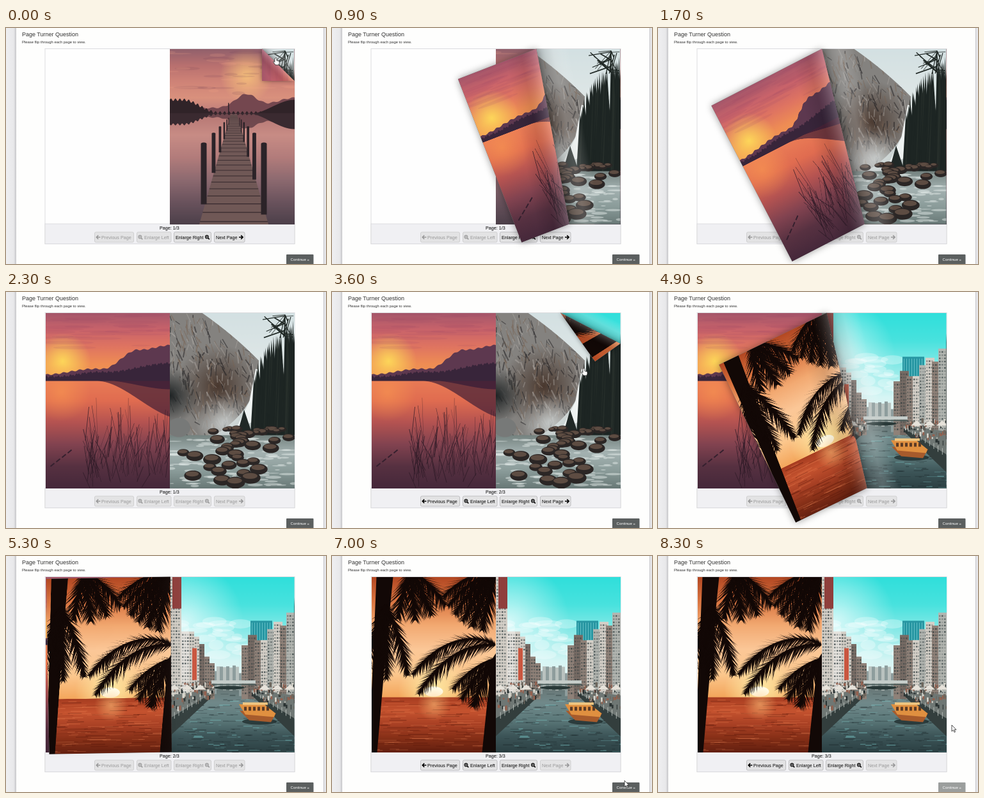
Animation of 500 by 370 pixels, one loop 8400 ms. Source, as an HTML page with a canvas:

```html
<!DOCTYPE html>
<html lang="en">
<head>
<meta charset="utf-8">
<title>Page Turner</title>
<style>
  html, body { margin: 0; width: 100%; height: 100%; overflow: hidden; background: #fefefd; }
  svg, canvas { position: absolute; left: 0; top: 0; width: 500px; height: 370px; }
  text { font-family: "Liberation Sans", Arial, sans-serif; }
  .btn text { font-size: 7.2px; fill: #000; }
  .btn rect { fill: #e3e3e4; stroke: #b4b4b6; stroke-width: .8; }
  .off text, .off use { opacity: .33; }
  .off rect { stroke: #c9c9cb; }
</style>
</head>
<body>
<svg viewBox="0 0 500 370">
  <defs>
    <linearGradient id="edge"><stop stop-color="#efeff1"/><stop offset=".75" stop-color="#e8e8ea"/><stop offset="1" stop-color="#c6c6c9"/></linearGradient>
    <path id="back" d="M3.2-3L.4 0l2.8 3M.6 0H6.4" fill="none" stroke="#000" stroke-width="1.7"/>
    <path id="next" d="M3.2-3L6 0 3.2 3M5.8 0H0" fill="none" stroke="#000" stroke-width="1.7"/>
    <g id="zoom" fill="none" stroke="#000"><circle cx="2.9" cy="-.5" r="2.4" stroke-width="1.1"/><path d="M4.7 1.3L6.8 3.4" stroke-width="1.6"/><path d="M1.6-.5h2.6M2.9-1.8v2.6" stroke-width=".8"/></g>
  </defs>
  <rect width="500" height="370" fill="#fefefd"/>
  <rect width="16" height="370" fill="url(#edge)"/>
  <rect x="496" width="4" height="370" fill="#e6e6e9"/>
  <rect x="496" width="1" height="370" fill="#c6c6c9"/>
  <text x="25" y="13" font-size="9" fill="#333">Page Turner Question</text>
  <text x="25" y="24" font-size="5.9" fill="#333">Please flip through each page to view.</text>
  <rect x="61" y="32.5" width="390" height="306" fill="#fefefe" stroke="#d9d9dc" stroke-width=".9"/>
  <rect x="61" y="307" width="390" height="31.5" fill="#f0f0f3" stroke="#d9d9dc" stroke-width=".9"/>
  <text id="label" x="240" y="316" font-size="7.2">Page: 1/3</text>
  <g class="btn"><rect x="138.5" y="320" width="61" height="16" rx="2"/><use href="#back" x="141" y="328"/><text x="149" y="330.5">Previous Page</text></g>
  <g class="btn"><rect x="204.5" y="320" width="53.5" height="16" rx="2"/><use href="#zoom" x="206.5" y="328"/><text x="216" y="330.5">Enlarge Left</text></g>
  <g class="btn"><rect x="262.5" y="320" width="58" height="16" rx="2"/><use href="#zoom" x="311" y="328"/><text x="265" y="330.5">Enlarge Right</text></g>
  <g class="btn"><rect x="325.5" y="320" width="47.5" height="16" rx="2"/><use href="#next" x="364" y="328"/><text x="328" y="330.5">Next Page</text></g>
  <g id="go"><rect x="438" y="355" width="42.5" height="16" rx="1" fill="#5b5f5f"/><text x="444.5" y="365" font-size="6.1" fill="#fff">Continue »</text></g>
</svg>
<canvas id="stage"></canvas>
<script>
const LOOP = 8400, W = 194.5, H = 275, LEFT = 61.5, SPINE = 256, TOP = 32.5;
const stage = document.getElementById('stage'), ctx = stage.getContext('2d');
const label = document.getElementById('label'), go = document.getElementById('go');
const buttons = [...document.querySelectorAll('.btn')];
const dpr = window.devicePixelRatio || 1;
stage.width = 500 * dpr;
stage.height = 370 * dpr;

// ---- painting helpers ----
const clamp = v => Math.max(0, Math.min(1, v));
const mix = (a, b, k) => a + (b - a) * k;
const smooth = (a, b, v) => { const k = clamp((v - a) / (b - a)); return k * k * (3 - 2 * k); };
const bump = (x, center, width) => Math.exp(-(((x - center) / width) ** 2));

function random(seed) {
  return (a = 0, b = 1) => {
    seed = (seed * 16807) % 2147483647;
    return mix(a, b, seed / 2147483647);
  };
}
function scene(seed, paint) {
  const el = document.createElement('canvas');
  el.width = W * 2;
  el.height = H * 2;
  const c = el.getContext('2d');
  c.scale(2, 2);
  paint(c, random(seed));
  return el;
}
function stops(g, colors) {
  colors.forEach((col, i) => g.addColorStop(i / (colors.length - 1), col));
  return g;
}
function box(c, color, x, y, w, h) {
  c.fillStyle = color;
  c.fillRect(x, y, w, h);
}
function band(c, y0, y1, ...colors) {
  box(c, stops(c.createLinearGradient(0, y0, 0, y1), colors), 0, y0, W + 1, y1 - y0);
}
function glow(c, x, y, r, rgb, alpha) {
  box(c, stops(c.createRadialGradient(x, y, 0, x, y, r), [`rgba(${rgb},${alpha})`, `rgba(${rgb},0)`]), x - r, y - r, 2 * r, 2 * r);
}
function poly(c, color, ...p) {
  c.fillStyle = color;
  c.beginPath();
  for (let i = 0; i < p.length; i += 2) c.lineTo(p[i], p[i + 1]);
  c.fill();
}
function ridge(c, color, base, height) {
  c.fillStyle = color;
  c.beginPath();
  c.moveTo(0, base);
  for (let x = 0; x <= W + 1; x++) c.lineTo(x, base - height(x));
  c.lineTo(W + 1, base);
  c.fill();
}
function blob(c, color, x, y, rx, ry) {
  c.fillStyle = color;
  c.beginPath();
  c.ellipse(x, y, rx, ry, 0, 0, 7);
  c.fill();
}
function line(c, color, width, x0, y0, x1, y1) {
  c.strokeStyle = color;
  c.lineWidth = width;
  c.beginPath();
  c.moveTo(x0, y0);
  c.lineTo(x1, y1);
  c.stroke();
}
function repeat(n, draw) {
  for (let i = 0; i < n; i++) draw(i, i / n);
}

// ---- the five pictures ----
const pier = scene(11, (c, r) => {
  band(c, 0, 103, '#90606c', '#b8706f', '#cf8377', '#d9917d', '#b97b7b');
  glow(c, 120, 42, 42, '255,205,125', .8);
  repeat(40, i => blob(c, i % 2 ? 'rgba(105,62,80,.14)' : 'rgba(245,170,135,.16)', r(0, W), r(4, 75), r(8, 28), r(1, 3)));
  band(c, 101, H, '#b57673', '#c88c85', '#b27c7b', '#8d6a70', '#6a535d', '#4d404a');
  const hills = x => 8 + 22 * bump(x, 120, 24) + 16 * smooth(130, W, x) + Math.sin(x * .4);
  const trees = x => 22 - 20 * smooth(20, 75, x) + 2 * Math.sin(x * .9);
  ridge(c, '#74474f', 101, hills);
  ridge(c, 'rgba(80,50,60,.7)', 101, x => -.8 * hills(x));
  ridge(c, '#302328', 102, x => Math.max(trees(x), 22 * smooth(125, W, x)));
  ridge(c, '#3a2a30', 101, x => -Math.max(trees(x) * .8, 25 * smooth(120, W, x)));
  box(c, '#30242a', 91, 85, 1.5, 18);
  poly(c, '#705856', 95, 103, 105, 103, 154, H, 46, H);
  for (let y = 105, gap = 1.6; y < H; y += gap, gap *= 1.085) {
    const k = (y - 103) / 172;
    line(c, '#3b2d30', .5 + k, 95 - 49 * k, y, 105 + 49 * k, y);
  }
  for (let s = 1; s > .1; s *= .65) {
    for (const [x, foot] of [[97 - 44 * s, 141], [104 + 43 * s, 157]]) {
      box(c, '#2b2328', x - 4.5 * s, 103 + 46 * s, 9 * s, (foot - 46) * s);
      blob(c, '#2b2328', x, 103 + 46 * s, 4.5 * s, 2 * s);
    }
  }
});

const lake = scene(5, (c, r) => {
  band(c, 0, 106, '#a4566a', '#c9636a', '#df7461', '#ee8c54', '#f09a52');
  glow(c, 27, 76, 44, '255,222,90', .9);
  repeat(30, () => blob(c, 'rgba(150,70,100,.12)', r(0, W), r(0, 60), r(15, 45), r(1, 3)));
  band(c, 104, H, '#ea7c56', '#e06c50', '#b45351', '#824350', '#573141', '#45283a');
  glow(c, 25, 125, 45, '255,160,80', .5);
  const mountain = x => 10 + 9 * smooth(0, 75, x) + 30 * smooth(90, 145, x) + 7 * smooth(150, W, x) + Math.sin(x * .5);
  const forest = x => 7 + 7 * smooth(20, 80, x) + 14 * smooth(95, W, x) + 2 * Math.sin(x) * Math.sin(x * .37);
  ridge(c, '#5d384f', 107, mountain);
  ridge(c, '#38253a', 107, forest);
  ridge(c, '#38253a', 106, x => -14 * smooth(90, W, x));
  ridge(c, 'rgba(75,35,55,.75)', 107, x => -52 * smooth(80, 215, x) * 1.15);
  repeat(110, () => {
    const x = r(62, W), y = r(200, H);
    line(c, 'rgba(42,24,36,.75)', r(.3, 1), x, y, x + r(-16, 18), y - r(20, 75));
  });
  repeat(4, i => line(c, '#35202e', 2, 8 + i * 9, 241 - i * 7, 14 + i * 9, 236 - i * 7));
});

const falls = scene(23, (c, r) => {
  band(c, 0, 195, '#d3e0e2', '#e1e8e7', '#b5bebd');
  c.save();
  c.beginPath();
  c.moveTo(0, 0);
  c.lineTo(50, 0);
  c.quadraticCurveTo(100, 35, 139, 75);
  c.quadraticCurveTo(140, 150, 70, 192);
  c.lineTo(0, 200);
  c.clip();
  box(c, '#84827f', 0, 0, W, H);
  glow(c, 75, 115, 65, '70,52,42', .95);
  repeat(420, i => {
    const x = r(0, 140), y = r(0, 190);
    line(c, ['rgba(38,36,37,.55)', 'rgba(185,180,174,.4)', 'rgba(120,98,80,.4)'][i % 3], r(.5, 2.4), x, y, x + r(-5, 9), y + r(4, 18));
  });
  glow(c, 0, 130, 45, '30,34,35', 1);
  c.restore();
  poly(c, '#eff3f2', 134, 88, 141, 90, 134, 170, 104, 180, 124, 140);
  glow(c, 85, 172, 45, '225,232,232', .7);
  repeat(60, (i, k) => {
    const x = mix(133, W, k) + r(-3, 3), top = mix(105, 18, Math.sqrt(k)) + r(-8, 12);
    poly(c, i % 4 ? '#1d2523' : '#262e2a', x, top, x + r(8, 13), 195, x - r(3, 8), 195);
  });
  repeat(24, () => line(c, '#202825', r(.5, 1.8), 180, r(0, 40), r(145, W), r(2, 44)));
  poly(c, '#202826', 116, 152, 128, 188, 106, 188);
  band(c, 192, H, '#74827f', '#a4b2b1', '#8b9c9a', '#697977');
  repeat(110, () => blob(c, 'rgba(235,241,239,.45)', r(0, W), r(196, 273), r(3, 15), r(.6, 2.4)));
  repeat(46, (i, k) => {
    const y = mix(182, 270, k * k), size = r(4, 9) + k * 7, x = i % 3 ? mix(r(45, W), r(0, 130), k) : r(0, W);
    blob(c, '#2b2625', x, y, size, size * .6);
    blob(c, '#5d4c42', x - 1, y - size * .2, size * .75, size * .3);
  });
  blob(c, '#777978', 14, 180, 18, 15);
});

// A stem that bends toward the ground, with leaflets on both sides.
function frond(c, r, x, y, angle, length, size) {
  const steps = Math.round(length / 2);
  repeat(steps, (i, k) => {
    angle += (Math.PI / 2 - angle) * .016;
    x += Math.cos(angle) * 2;
    y += Math.sin(angle) * 2;
    line(c, '#120806', 2.4 - k, x, y, x + Math.cos(angle) * 3, y + Math.sin(angle) * 3);
    const leaf = size * Math.sin(Math.PI * (.2 + k * .72));
    for (const turn of [-.7, .7]) {
      const a = angle + turn + r(-.18, .18), len = leaf * r(.75, 1.2);
      poly(c, '#120806', x - 1, y, x + 1.4, y, x + Math.cos(a) * len, y + Math.sin(a) * len + len * .3);
    }
  });
}
function crown(c, r, x, y, count, from, to, length, size) {
  repeat(count, i => frond(c, r, x, y, mix(from, to, i / (count - 1)), length, size));
}
const palms = scene(31, (c, r) => {
  band(c, 0, 190, '#b24722', '#d97440', '#f2a971', '#fbc797', '#fcc88e', '#f3a55a');
  glow(c, 97, 178, 55, '255,240,170', .95);
  blob(c, '#fffbe6', 97, 180, 15, 8);
  band(c, 189, H, '#a63c20', '#c5532f', '#a84024', '#852f17', '#642010');
  repeat(160, i => {
    const x = r(-10, W), y = r(191, 273);
    line(c, i % 2 ? 'rgba(85,20,8,.4)' : 'rgba(245,140,90,.3)', r(.5, 1.4), x, y, x + r(8, 40), y);
  });
  glow(c, 98, 200, 26, '255,190,120', .6);
  poly(c, '#120806', 8, 0, 34, 0, 24, 100, 9, H, 0, H, 0, 190);
  poly(c, '#120806', 188, 130, W, 120, W, H, 173, H);
  crown(c, r, 60, -12, 4, .5, 1.9, 78, 27);
  crown(c, r, 22, 42, 3, 1.1, 2, 115, 24);
  crown(c, r, W, -8, 6, 3.2, 1.9, 92, 27);
  crown(c, r, W, 108, 2, 3.75, 3.35, 150, 25);
  crown(c, r, W, 128, 3, 2.9, 2.2, 82, 25);
});

function tower(c, r, x, top, w) {
  const walls = ['#d5d0c8', '#8f8178', '#b3b6b1', '#e6e3de', '#776b64', '#c9a292'];
  box(c, walls[Math.floor(r(0, 6))], x, top, w, 192 - top);
  for (let y = top + 4; y < 186; y += 5) {
    for (let v = x + 1; v < x + w - 2; v += 4) box(c, `rgba(45,58,60,${r(.15, .75)})`, v, y, 2.6, 2.6);
  }
}
const canal = scene(47, (c, r) => {
  band(c, 0, 175, '#2fdfdb', '#48e2de', '#8deae8', '#d5f5f4', '#f1f8f7');
  glow(c, 20, 70, 95, '245,255,255', .75);
  repeat(26, () => blob(c, 'rgba(250,255,255,.3)', r(15, 125), r(62, 125), r(8, 22), r(3, 8)));
  band(c, 172, H, '#667473', '#71898a', '#5d7a7b', '#3d5558', '#2c4043');
  repeat(190, i => {
    const y = r(182, 274), x = r(0, W);
    line(c, i % 3 ? 'rgba(25,38,40,.4)' : 'rgba(130,215,215,.4)', r(.5, 1.8), x, y, x + r(4, 18), y);
  });
  repeat(16, i => box(c, i % 2 ? '#b9c2bf' : '#8e9d9d', 58 + i * 5, r(138, 152), 5, 36));
  box(c, '#2796a2', 126, 69, 34, 110);
  for (let x = 128; x < 158; x += 4) box(c, '#62bfc6', x, 72, 1, 100);
  repeat(6, i => tower(c, r, 58 - i * 8, 128 - i * 10 + r(-8, 8), 12));
  repeat(8, i => tower(c, r, 112 + i * 10, 108 - i * 6 + r(-14, 10), 14));
  tower(c, r, 0, 0, 18);
  box(c, '#8f3f3c', 4, 0, 14, 50);
  box(c, '#c9563f', 35, 112, 7, 50);
  for (const side of [-1, 1]) {
    const edge = side < 0 ? 0 : W, far = 98 + side * 30;
    poly(c, '#6f7774', far, 176, edge, 186, edge, 246, far, 184);
    poly(c, '#333e3d', far, 181, edge, 222, edge, 250, far, 186);
    repeat(70, (i, k) => {
      const x = mix(far, edge, k);
      box(c, ['#2b3333', '#6d665d', '#d8d6cd', '#94614f'][i % 4], x, r(164, 184 + 24 * k), r(1, 4), r(2, 8));
    });
    repeat(10, (i, k) => box(c, '#c4cbc6', mix(far, edge, k), 178 + 38 * k, .8, 4 + 7 * k));
    repeat(3, i => poly(c, '#e6e2da', mix(far, edge, .3 + i * .3) - 9, 177, mix(far, edge, .3 + i * .3), 169, mix(far, edge, .3 + i * .3) + 9, 177));
  }
  line(c, '#c4ccc9', 5, 65, 165, 134, 165);
  line(c, '#4f605e', 2, 66, 169, 134, 169);
  blob(c, '#293938', 93, 174, 24, 3);
  blob(c, 'rgba(20,32,32,.65)', 140, 227, 27, 5);
  poly(c, '#a75b2c', 109, 210, 166, 214, 158, 228, 124, 225);
  poly(c, '#e09040', 108, 200, 146, 199, 165, 214, 163, 220, 118, 216);
  box(c, '#f0c681', 114, 197, 39, 4);
  for (let x = 116; x < 154; x += 7) box(c, '#5b3a25', x, 204, 4, 6);
});

// ---- motion: key points of the dragged corner as [time, x, y] ----
const turns = [
  { from: 0, release: 1300, end: 2200, done: 2800, left: null, front: pier, back: lake, under: falls,
    corner: [[0, 400, 83], [600, 330, 110], [1200, 108, 60], [1700, 83, 122], [2300, LEFT, TOP]],
    hand: { dx: 21, dy: -36, until: 600 } },
  { from: 3200, release: 4800, end: 5500, done: 6000, left: lake, front: falls, back: palms, under: canal,
    corner: [[3100, 450, TOP], [3600, 411, 109], [4000, 300, 190], [4400, 148, 196], [4800, 110, 150], [5500, LEFT, TOP]],
    hand: { dx: -18, dy: 11, until: 4000 } }
];
const arrowPath = [[7000, 457, 352], [7900, 458, 359], [LOOP, 459, 265]];

// Each move arrives one 100 ms step before the next key point; a settling move eases out.
function along(path, t, settle = false) {
  let i = 1;
  while (i < path.length - 1 && path[i][0] <= t) i++;
  const [t0, x0, y0] = path[i - 1], [t1, x1, y1] = path[i];
  let k = clamp((t - t0) / (t1 - t0 - 100));
  if (settle && i === path.length - 1) k = 1 - (1 - k) ** 2;
  return [mix(x0, x1, k), mix(y0, y1, k)];
}

function trace(points) {
  ctx.beginPath();
  points.forEach(p => ctx.lineTo(p[0], p[1]));
  ctx.closePath();
}
function fade(x, y, dx, dy, ...colors) {
  box(ctx, stops(ctx.createLinearGradient(x, y, x + dx, y + dy), colors), 0, 0, 500, 370);
}

// The fold is the perpendicular bisector between the corner's rest place and its current place.
function drawFold(turn, t) {
  let [px, py] = along(turn.corner, t, true);
  const limit = Math.min(1, W / Math.hypot(px - SPINE, py - TOP));
  px = mix(SPINE, px, limit);
  py = mix(TOP, py, limit);
  const ax = SPINE + W, d = Math.hypot(px - ax, py - TOP);
  if (d < 2) return;
  const nx = (px - ax) / d, ny = (py - TOP) / d, mx = (px + ax) / 2, my = (py + TOP) / 2;
  const side = p => (p[0] - mx) * nx + (p[1] - my) * ny;
  const page = [[SPINE, TOP], [ax, TOP], [ax, TOP + H], [SPINE, TOP + H]], lifted = [];
  page.forEach((p, i) => {
    const q = page[(i + 1) % 4], a = side(p), b = side(q);
    if (a <= 0) lifted.push(p);
    if (a * b < 0) lifted.push([mix(p[0], q[0], a / (a - b)), mix(p[1], q[1], a / (a - b))]);
  });
  const flap = lifted.map(p => [p[0] - 2 * side(p) * nx, p[1] - 2 * side(p) * ny]);
  const height = clamp((py - TOP) / 40), depth = Math.min(50, d / 3);

  ctx.save();
  trace(lifted);
  ctx.clip();
  ctx.drawImage(turn.under, SPINE, TOP, W, H);
  fade(mx, my, -nx * depth, -ny * depth, `rgba(90,90,90,${.3 * height})`, `rgba(215,215,215,${.25 * height})`, 'rgba(255,255,255,0)');
  ctx.restore();

  ctx.save();
  ctx.shadowColor = `rgba(0,0,0,${.4 * height})`;
  ctx.shadowBlur = Math.min(12, d / 12) * dpr;
  trace(flap);
  ctx.fillStyle = '#777';
  ctx.fill();
  ctx.restore();

  ctx.save();
  trace(flap);
  ctx.clip();
  ctx.save();
  ctx.translate(px, py);
  ctx.rotate(Math.atan2(2 * nx * ny, 2 * nx * nx - 1));
  ctx.drawImage(turn.back, 0, 0, W, H);
  ctx.restore();
  fade(mx, my, nx * depth, ny * depth, `rgba(255,255,255,${.22 * height})`, `rgba(0,0,0,${.1 * height})`, 'rgba(0,0,0,0)');
  ctx.restore();
}

const handShape = new Path2D('M0 0C1-1 2 0 2 1V4L5 4.6 6 5.5V8.5L5 11H0L-3 7C-4 5-2.5 4.7-1.2 6.4L-1 1Z');
const arrowShape = new Path2D('M0 0V10L2.4 7.9 4 11.4 5.6 10.7 4 7.3H7Z');
function pointer(shape, x, y) {
  ctx.save();
  ctx.translate(x, y);
  ctx.fillStyle = '#fff';
  ctx.strokeStyle = '#222';
  ctx.lineWidth = .8;
  ctx.fill(shape);
  ctx.stroke(shape);
  ctx.restore();
}

function render(time) {
  const t = Math.floor(time % LOOP / 100) * 100;
  const turn = t < turns[1].from ? turns[0] : turns[1];
  const turned = t >= turn.end;
  const left = turned ? turn.back : turn.left, right = turned ? turn.under : turn.front;
  ctx.setTransform(dpr, 0, 0, dpr, 0, 0);
  ctx.clearRect(0, 0, 500, 370);
  if (left) ctx.drawImage(left, LEFT, TOP, W, H);
  ctx.drawImage(right, SPINE, TOP, W, H);
  if (!turned) drawFold(turn, t);
  if (t <= turn.hand.until) {
    const [x, y] = along(turn.corner, t);
    pointer(handShape, x + turn.hand.dx, y + turn.hand.dy);
  }
  if (t >= arrowPath[0][0]) pointer(arrowShape, ...along(arrowPath, t));

  const spread = 1 + turns.filter(f => t >= f.done).length;
  const busy = t >= turn.release && t < turn.done;
  label.textContent = `Page: ${spread}/3`;
  buttons.forEach((b, i) => b.classList.toggle('off', busy || (spread === 1 && i < 2) || (spread === 3 && i === 3)));
  go.style.opacity = t >= 7600 ? .6 : 1;
}
const start = performance.now();
(function tick() {
  render(performance.now() - start);
  requestAnimationFrame(tick);
})();
</script>
</body>
</html>
```
